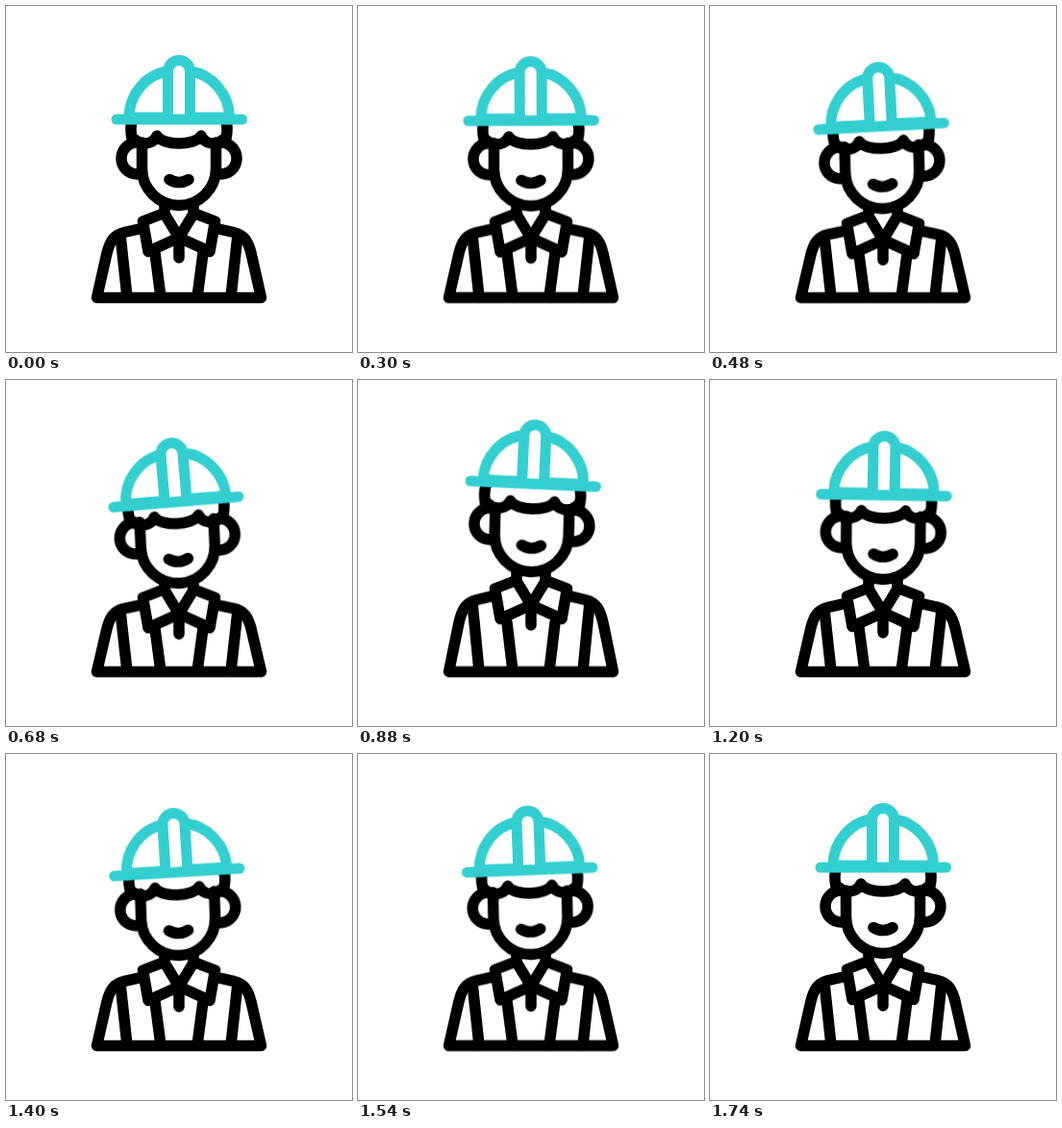
An HTML page without scripts that plays this animation: 360x360 px, repeating every 2.2 s.

```html
<!DOCTYPE html>
<html lang="en">
<head>
<meta charset="utf-8">
<title>Worker nodding</title>
<style>
  html, body { margin: 0; width: 100%; height: 100%; overflow: hidden; background: #fff; }
  svg { display: block; width: 100vw; height: 100vh; }
  path { fill: none; stroke: #000; stroke-width: 11.5; stroke-linecap: round; stroke-linejoin: round; }
  .fill { fill: #fff; }
  .hat path { stroke: #33cfd0; stroke-width: 11; }
  .torso path { vector-effect: non-scaling-stroke; }

  .torso, .collar, .head, .tilt, .nod {
    animation: 2200ms cubic-bezier(.37, 0, .63, 1) infinite;
  }
  .torso { transform-origin: 180px 303px; animation-name: stretch; }
  .collar { animation-name: lift; }
  .head { animation-name: bob; }
  .tilt { transform-origin: 180px 195px; animation-name: tilt; --t: .55; }
  .hat .tilt { transform-origin: 180px 118px; --t: .45; }
  .nod { animation-name: nod; --k: 1; }
  .fringe { --k: .5; }
  .mouth { --k: .3; }

  @keyframes stretch {
    0%, 9.09%, 79.1%, 100% { transform: scaleY(1); }
    29.09% { transform: scaleY(.955); }
    39.09% { transform: scaleY(1.099); }
    56.36% { transform: scaleY(.983); }
  }
  @keyframes lift {
    0%, 9.09%, 79.1%, 100% { transform: translateY(0); }
    29.09% { transform: translateY(3.2px); }
    39.09% { transform: translateY(-7px); }
    56.36% { transform: translateY(1.2px); }
  }
  @keyframes bob {
    0%, 9.09%, 79.1%, 100% { transform: translateY(0); }
    29.09% { transform: translateY(4.8px); }
    40.91% { transform: translateY(-8px); }
    60.91% { transform: translateY(2.3px); }
  }
  @keyframes nod {
    0%, 9.09%, 79.1%, 100% { transform: translateY(0); }
    29.09% { transform: translateY(calc(var(--k) * 5.2px)); }
    40.91% { transform: translateY(calc(var(--k) * -2.2px)); }
    60.91% { transform: translateY(calc(var(--k) * 3px)); }
  }
  @keyframes tilt {
    0%, 10.91%, 79.1%, 100% { transform: rotate(0deg); }
    30% { transform: rotate(calc(var(--t) * -4.9deg)); }
    45.45% { transform: rotate(calc(var(--t) * 5.4deg)); }
    63.64% { transform: rotate(calc(var(--t) * -3.5deg)); }
  }
</style>
</head>
<body>
<svg viewBox="0 0 360 360">
  <g class="torso">
    <path d="M143 231L123 235.500C112 238 108 245 105 257L94.500 303.500H265.500L255 257C252 245 248 238 237 235.500L217 231"/>
    <path d="M119 238L126 303M241 238L234 303M155 257L161 303M205 257L199 303"/>
  </g>

  <g class="collar">
    <path d="M165 200V215M195 200V215M180 241V262"/>
    <path class="fill" d="M142.500 224L164.500 215.500L180 241L148 255.500Z"/>
    <path class="fill" d="M217.500 224L195.500 215.500L180 241L212 255.500Z"/>
  </g>

  <g class="head">
    <g class="tilt">
      <path class="fill" d="M136.500 142A16.500 16.500 0 1 0 136.500 175M223.500 142A16.500 16.500 0 1 1 223.500 175"/>
      <path d="M140 105C130 113 128.500 125 131 138M220 105C230 113 231.500 125 229 138"/>
      <path class="fill" d="M141.500 142V169A38.500 38.500 0 0 0 218.500 169V142"/>
      <g class="nod fringe">
        <path d="M133 138C141 146 153 144 157 135C163 145.500 197 145.500 203 135C207 144 219 146 227 138"/>
      </g>
      <g class="nod mouth">
        <path d="M170 180.500Q180 186.500 190 180.500"/>
      </g>
      <g class="nod hat">
        <g class="tilt">
          <path class="fill" d="M128 116C128 92 146 71 168 68H192C214 71 232.500 92 232.500 116Z"/>
          <path class="fill" d="M168.500 116V68A11.500 11.500 0 0 1 191.500 68V116"/>
          <path d="M115 118H245.500"/>
        </g>
      </g>
    </g>
  </g>
</svg>
</body>
</html>
```
